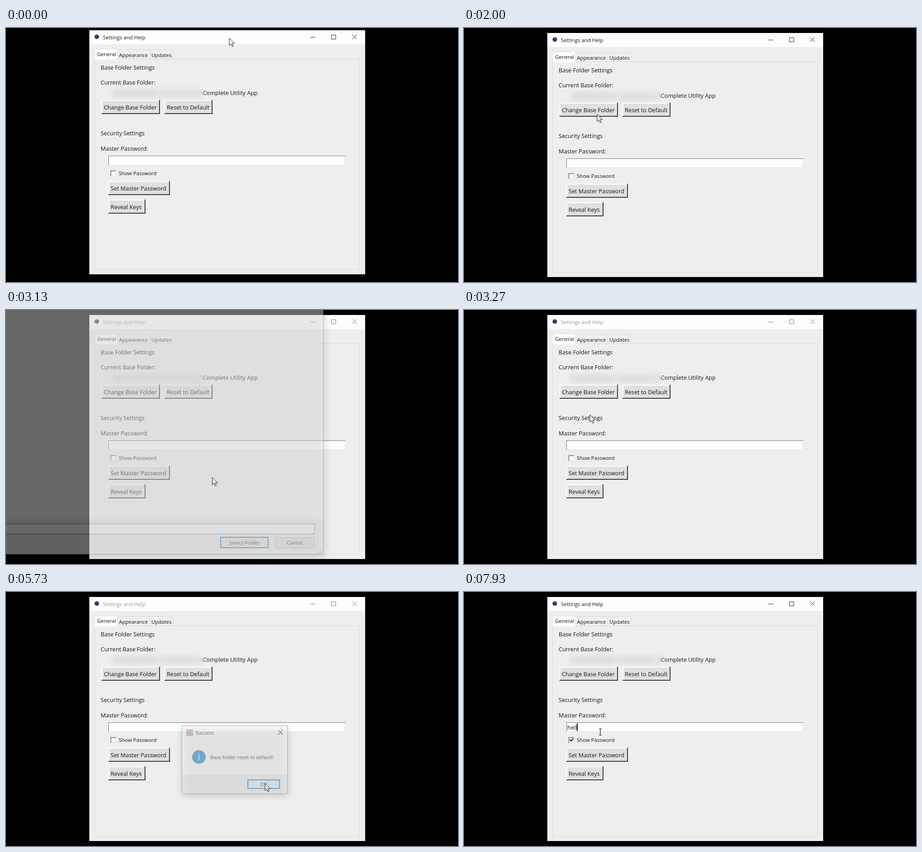
An HTML page for the animation above (8 s loop, 998 by 561 pixels).

```html
<!DOCTYPE html>
<html lang="en">
<head>
<meta charset="utf-8">
<title>Settings and Help</title>
<style>
  html, body { margin: 0; width: 100%; height: 100%; overflow: hidden; background: #000; }
  svg { display: block; width: 100vw; height: 100vh; }
  text { font: 12.65px "Open Sans", "Noto Sans", sans-serif; fill: #161616; white-space: pre; }
  text.ui { font-size: 11.45px; }
  .crisp { shape-rendering: crispEdges; }
</style>
</head>
<body>
<svg id="stage" viewBox="0 0 998 561" xmlns="http://www.w3.org/2000/svg">
  <defs>
    <filter id="smear" x="-20%" y="-60%" width="140%" height="220%"><feGaussianBlur stdDeviation="5"/></filter>
    <filter id="soft" x="-20%" y="-20%" width="140%" height="140%"><feGaussianBlur stdDeviation="8"/></filter>
    <clipPath id="frame"><rect x="184" y="11" width="609" height="539"/></clipPath>
  </defs>
  <rect width="998" height="561"/>
  <g id="win" clip-path="url(#frame)"></g>
  <g clip-path="url(#frame)"><rect id="folderShade" x="-60" y="-40" width="764" height="586" fill="#000" filter="url(#soft)"/></g>
  <g id="folder"></g>
  <g clip-path="url(#frame)"><rect id="msgShade" x="389" y="300" width="234" height="150" fill="#000" filter="url(#soft)"/></g>
  <g id="msg"></g>
  <path id="arrow" d="M0 .5V16.6L3.8 13.1 6.4 19 8.8 18 6.3 12.1H11.5Z" fill="#fff" stroke="#111" stroke-width="1"/>
  <path id="beam" d="M-3 -7H-1L0 -6 1 -7H3M0 -6V6M-3 7H-1L0 6 1 7H3" fill="none" stroke="#111" stroke-width="1.2"/>
</svg>
<script>
const LOOP = 8000;
const $ = id => document.getElementById(id);

function add(parent, tag, attrs, text) {
  const el = document.createElementNS("http://www.w3.org/2000/svg", tag);
  for (const key in attrs) el.setAttribute(key, attrs[key]);
  if (text) el.textContent = text;
  parent.append(el);
  return el;
}
const box = (p, x, y, width, height, fill, more) =>
  add(p, "rect", { x, y, width, height, fill, class: "crisp", ...more });
const label = (p, x, y, text, more) => add(p, "text", { x, y, ...more }, text);
const line = (p, d, stroke, more) =>
  add(p, "path", { d, stroke, fill: "none", ...more });
const outline = (p, x, y, w, h, fill, stroke, weight = 1) =>
  box(p, x + weight / 2, y + weight / 2, w - weight, h - weight, fill, { stroke, "stroke-width": weight });

// Raised button whose bevel flips while pressed.
function button(p, x, y, w, h, text) {
  box(p, x, y, w, h, "#e0e0e0");
  const bevel = (d, color) => line(p, d, color, { "stroke-width": 2, class: "crisp" });
  const lit = bevel(`M${x + 1} ${y + h}V${y + 1}H${x + w}`, "#fdfdfd");
  const dark = bevel(`M${x} ${y + h - 1}H${x + w - 1}V${y}`, "#3c3c3c");
  const caption = label(p, x + 5, y + 20.5, text);
  return down => {
    lit.setAttribute("stroke", down ? "#5a5a5a" : "#fdfdfd");
    dark.setAttribute("stroke", down ? "#fdfdfd" : "#3c3c3c");
    caption.setAttribute("transform", down ? "translate(1 1)" : "");
  };
}

function buildWindow(p) {
  box(p, 184, 11, 609, 539, "#eeeeee");
  box(p, 184, 11, 609, 31, "#fdfdfd");
  add(p, "circle", { cx: 200.5, cy: 25.5, r: 5, fill: "#2a4262" });
  const title = label(p, 214, 30.5, "Settings and Help", { class: "ui" });
  const controls = line(p, "M672 26.5H683M718.5 21.5H728V30.5H718.5ZM764.5 20.5L774.5 30.5M774.5 20.5L764.5 30.5", "#222");

  outline(p, 195, 74, 586, 466, "#eeeeee", "#dadada");
  outline(p, 246, 54, 72, 21, "#efefef", "#d9d9d9");
  outline(p, 317, 54, 52, 21, "#efefef", "#d9d9d9");
  outline(p, 195, 52, 52, 24, "#fdfdfd", "#dadada");
  box(p, 196, 74, 50, 2, "#fdfdfd");
  label(p, 201, 68, "General", { class: "ui" });
  label(p, 249.5, 70, "Appearance", { class: "ui" });
  label(p, 321, 70, "Updates", { class: "ui" });

  label(p, 209, 97.5, "Base Folder Settings");
  label(p, 209, 130.5, "Current Base Folder:");
  label(p, 430, 154, "\\Complete Utility App");
  const smear = add(p, "g", { filter: "url(#smear)" });
  box(smear, 234, 140, 200, 22, "#e3e3e3");
  box(smear, 240, 144, 90, 14, "#dfdfda");
  box(smear, 345, 144, 70, 14, "#e0e0e0");
  const change = button(p, 211, 165, 129, 31, "Change Base Folder");
  const reset = button(p, 350, 165, 106, 31, "Reset to Default");

  label(p, 209, 243, "Security Settings");
  label(p, 209, 276.5, "Master Password:");
  box(p, 226, 288, 523, 21, "#fdfdfd");
  line(p, "M226.5 309V288.5H749", "#767676", { class: "crisp" });
  line(p, "M227 308.5H748.5V289", "#e2e2e2", { class: "crisp" });
  const entry = label(p, 228, 303.5, "");
  const caret = box(p, 228, 290, 2, 17, "#111");

  box(p, 231, 321, 12, 12, "#fdfdfd");
  line(p, "M231.5 333V321.5H243", "#6a6a6a", { "stroke-width": 1.5 });
  line(p, "M232 332.5H242.5V322", "#dddddd");
  const tick = line(p, "M233.8 326.2L236.4 329 241 324", "#111", { "stroke-width": 2 });
  label(p, 249, 331, "Show Password", { class: "ui" });
  button(p, 226, 344, 136, 31, "Set Master Password");
  button(p, 226, 385, 82, 31, "Reveal Keys");
  return { title, controls, change, reset, entry, caret, tick };
}

function buildFolder(p) {
  box(p, -2, -2, 702, 541, "#fdfdfd");
  box(p, -2, 462, 702, 77, "#eeeeee");
  outline(p, -4, 472, 686, 23, "#fdfdfd", "#2d86cc");
  outline(p, 473, 501, 107, 25, "#e1e1e1", "#0a74cf", 2);
  outline(p, 594, 502, 87, 24, "#e1e1e1", "#adadad");
  label(p, 526.5, 517.5, "Select Folder", { class: "ui", "text-anchor": "middle" });
  label(p, 637.5, 517.5, "Cancel", { class: "ui", "text-anchor": "middle" });
  for (let row = 0; row < 3; row++)
    for (let col = 0; col <= row; col++)
      box(p, 695 - col * 3, 530 + row * 3, 2, 2, "#b0b0b0");
  line(p, "M0 539.5H700.5V0", "#777", { class: "crisp" });
}

function buildMessage(p) {
  outline(p, 388, 295, 234, 151, "#fdfdfd", "#6c6c6c");
  box(p, 389, 404, 232, 41, "#eeeeee");
  box(p, 398, 303, 15, 15, "#c4a5a2");
  label(p, 418, 315.3, "Success", { class: "ui" });
  line(p, "M601 305L611 315M611 305L601 315", "#222", { "stroke-width": 1.2 });
  add(p, "circle", { cx: 426, cy: 364.5, r: 15, fill: "#1a86d0" });
  label(p, 426, 371.5, "i", { style: "font-size:21px;fill:#fff", "text-anchor": "middle" });
  label(p, 451, 369, "Base folder reset to default!", { style: "font-size:10.8px" });
  const ok = outline(p, 533, 414, 72, 21, "#e1e1e1", "#0a78d7", 2);
  label(p, 569, 428.6, "OK", { style: "font-size:11px", "text-anchor": "middle" });
  return ok;
}

const ui = buildWindow($("win"));
buildFolder($("folder"));
const ok = buildMessage($("msg"));

// Pointer stops: time, x, y.
const stops = [
  [0, 493, 22], [200, 493, 22], [550, 493, 28], [900, 493, 28], [1650, 294, 190],
  [2200, 294, 190], [2470, 392, 186], [2900, 637, 511], [2990, 637, 511],
  [3270, 278, 231], [3500, 290, 225], [4250, 401, 180], [4950, 401, 180],
  [5500, 572, 422], [5850, 572, 422], [6500, 236, 325], [6750, 236, 325],
  [7150, 301, 301], [7500, 301, 309], [LOOP, 301, 309]
];
const keys = [7420, 7580, 7740, 7890];

const clamp = v => Math.min(1, Math.max(0, v));
const ease = v => v * v * (3 - 2 * v);
const ramp = (t, from, to) => clamp((t - from) / (to - from));
const within = (t, from, to) => t >= from && t < to;

function pointer(t) {
  const i = stops.findIndex(s => s[0] > t);
  const a = stops[i - 1], b = stops[i];
  const k = ease(ramp(t, a[0], b[0]));
  return [a[1] + (b[1] - a[1]) * k, a[2] + (b[2] - a[2]) * k];
}

function render(t) {
  const [x, y] = pointer(t);
  const lift = 6 * (1 - ease(ramp(t, 200, 550)));
  $("win").setAttribute("transform", `translate(0 ${-lift})`);

  const folder = ramp(t, 2300, 2420) * (1 - ramp(t, 3060, 3180));
  const msg = ramp(t, 4780, 4930) * (1 - ramp(t, 5660, 5800));
  $("folder").setAttribute("opacity", folder);
  $("folderShade").setAttribute("opacity", folder * 0.35);
  $("msg").setAttribute("opacity", msg);
  $("msgShade").setAttribute("opacity", msg * 0.3);

  const idle = within(t, 2260, 3340) || within(t, 4760, 5800);
  ui.title.style.fill = idle ? "#999" : "#161616";
  ui.controls.setAttribute("stroke", idle ? "#7c7c7c" : "#222");
  ui.change(within(t, 2090, 2180));
  ui.reset(within(t, 4620, 4710));

  const hover = t > 5400;
  ok.setAttribute("fill", hover ? "#e1eff8" : "#e1e1e1");
  ok.setAttribute("stroke-width", hover ? 1.2 : 2);

  ui.tick.style.display = t >= 6650 ? "" : "none";
  ui.entry.textContent = "hell".slice(0, keys.filter(k => t >= k).length);
  ui.caret.style.display = t >= 7200 ? "" : "none";
  ui.caret.setAttribute("x", 228 + ui.entry.getComputedTextLength());

  const inEntry = t > 6750 && y <= 310;
  $("arrow").style.display = inEntry ? "none" : "";
  $("beam").style.display = inEntry ? "" : "none";
  $(inEntry ? "beam" : "arrow").setAttribute("transform", `translate(${x} ${y})`);
}

const start = performance.now();
function tick() {
  render((performance.now() - start) % LOOP);
  requestAnimationFrame(tick);
}
tick();
</script>
</body>
</html>
```
